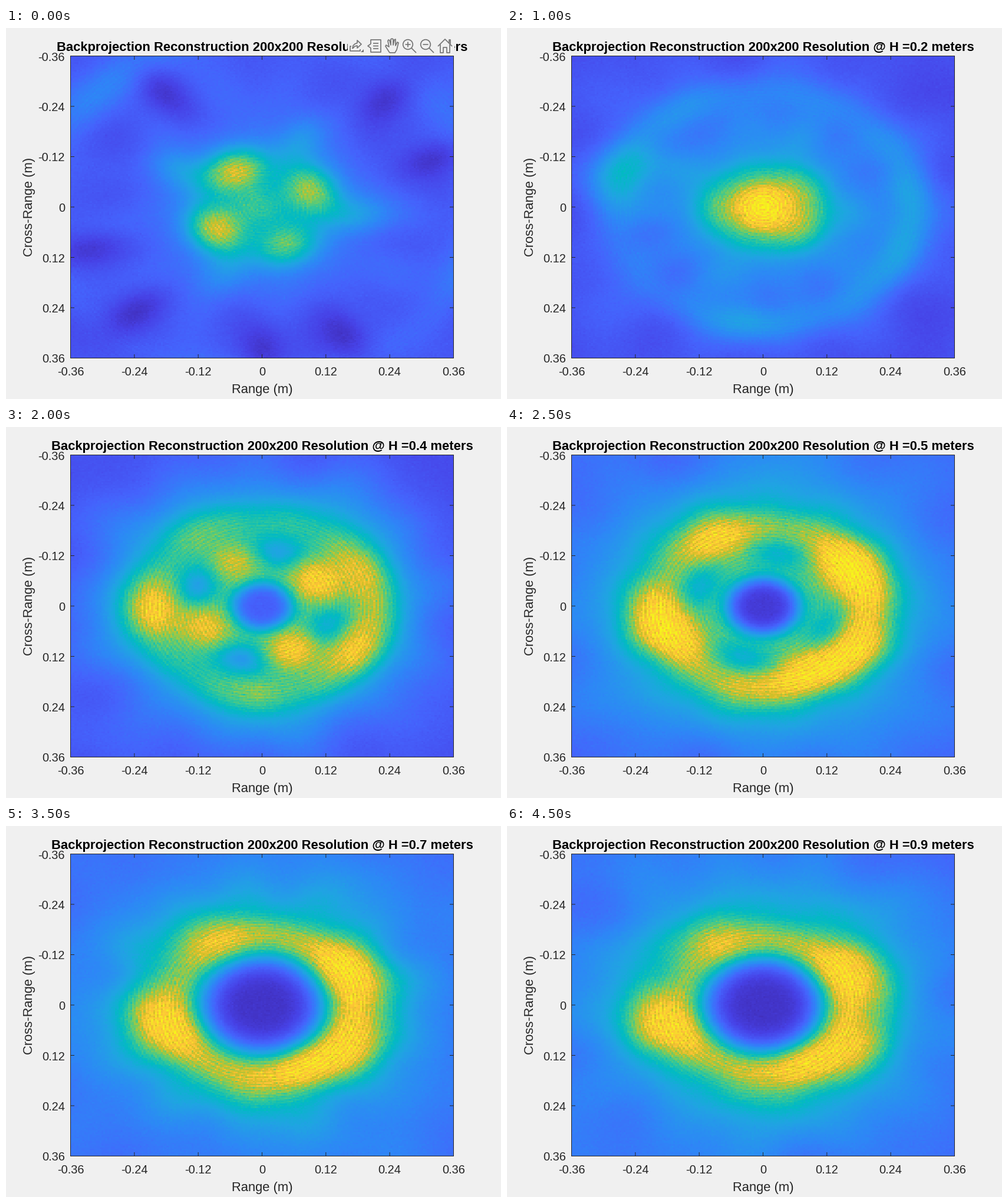
Recreate the animation shown at these times as a matplotlib script. Size 840 by 630 pixels, loop 5000 ms.

```python
import numpy as np
import matplotlib.pyplot as plt
from matplotlib.animation import FuncAnimation
from matplotlib.colors import LinearSegmentedColormap
from matplotlib.patches import Circle, Polygon, Rectangle

W, H, DPI = 840, 630, 100
LEFT, RIGHT, TOP, BOTTOM = 109.5, 759.5, 47.5, 560.5
INK, ICON, PAPER = "#262626", "#757575", "#f0f0f0"
FONT = "Liberation Sans"

PARULA = [
    (.242, .150, .660), (.278, .256, .899), (.270, .389, .991),
    (.179, .529, .968), (.125, .646, .888), (.007, .731, .766),
    (.216, .784, .592), (.504, .799, .348), (.820, .750, .154),
    (.997, .766, .220), (.960, .914, .142), (.977, .984, .081)]
CMAP = LinearSegmentedColormap.from_list("parula", PARULA, 256)

# Round part of the picture, by scan height in metres.
HEIGHTS = (0, .1, .3, .4, .5, .7)
PROFILE = dict(
    level=(.15, .14, .11, .11, .18, .19),
    skirt=(.20, .20, .20, .20, .15, .15),
    spread=(13, 12, 24, 25, 28, 28),
    plate=(0, 0, .10, .24, .24, .17),
    ring=(.03, .05, .08, .08, .16, .23),
    hole=(0, 0, 0, .38, .50, .46),
    pit=(4, 4, 4, 5, 6, 9.8))

# Reflectors as bearing in degrees (clockwise from right) and strength.
MAIN = [(-31, .40), (60, .40), (243, .27), (155, .33)]
TRAILING = [(34, .22), (-29, .18), (178, .14)]
ON_RING = [(-8, .12), (22, .10), (95, .10), (235, .10)]
GAPS = [(202, -.22), (107, -.22), (283, -.20), (25, -.18)]
RAYS = [(5, .13), (210, .11), (295, .10), (115, .08)]
SHADES = [(b, -.10) for b in (236, 312, 340, 163, 134, 90, 63)]

axis = (np.arange(200) + .5) * .36 - 36
X, Y = np.meshgrid(axis, axis)
R, THETA = np.hypot(X, Y), np.arctan2(Y, X)


def bell(q, power=1):
    return np.exp(-.5 * np.abs(q) ** (2 * power))


def lobes(group, radius, gain, depth=3.3, width=None):
    """Sum of soft spots, each deep along its bearing and wide across it."""
    width = width or 3 + abs(radius) / 10
    total = 0
    for bearing, strength in group:
        c, s = np.cos(np.radians(bearing)), np.sin(np.radians(bearing))
        along, across = X * c + Y * s - radius, Y * c - X * s
        total = total + gain * strength * bell(along / depth) * bell(across / width)
    return total


def field(h):
    p = {name: np.interp(h, HEIGHTS, keys) for name, keys in PROFILE.items()}
    ring = 14 + 27 * np.exp(-h / .3)
    reach = min(55 * h - 10, 17.5)      # reflectors cross the centre, then settle
    early = np.exp(-(h / .2) ** 2)
    focus = np.exp(-((h - .15) / .08) ** 2)

    v = p["level"] + p["skirt"] * bell(R / p["spread"]) + p["plate"] * bell(R / 24, 2)
    v += p["ring"] * bell((R - ring) / 3) * (1 + .28 * np.cos(THETA - .5))
    v -= p["hole"] * bell(R / p["pit"], 2)
    v += .3 * focus * bell(R / 8.8, 2)

    fade = np.interp(h, (0, .3, .5, .7), (1.1, .9, .8, .5))
    v += lobes(MAIN, reach, fade * (1 - .8 * focus))
    v += lobes(TRAILING, min(reach + 8, 21), 1 - .65 * early)
    grow = min(1, .45 + 1.5 * h)
    v += lobes(ON_RING, max(ring, 21), grow)
    v += lobes([(max(219 - 100 * h, 166), .23)], max(ring, 21), grow, 4)
    v += lobes(GAPS, 13, np.exp(-((h - .42) / .13) ** 2), 2.7, 4.2)
    v += lobes(RAYS, 17, early, 5, 3)
    v += lobes(SHADES, ring - 7, early, 5.5, 3)
    return v, ring


def picture(i):
    v, ring = field(i / 10)
    rng = np.random.RandomState(i + 3)
    for n in (3, 5, 8, 13):
        turn, wave = rng.uniform(0, 6.3, 2)
        streak = np.sin(n * THETA + turn) * np.cos(R / 6 + wave)
        v += .014 * np.clip((R - 16) / 10, 0, 1) * streak
    v = np.where(v > .82, .82 + .3 * (v - .82), v)
    bright = np.clip(v - .38, 0, .4)
    near = bell((R - ring) / 4)
    v += (.006 * near + .12 * bright) * np.sin(2 * np.pi * R / .83)
    v += (.005 + .07 * bright) * rng.standard_normal(v.shape)
    return np.clip(v, .005, .97)


fig = plt.figure(figsize=(W / DPI, H / DPI), dpi=DPI, facecolor=PAPER)
ax = fig.add_axes([0, 0, 1, 1])
ax.axis("off")


def text(x, y, s, px, **kw):
    kw = {"ha": "center", "va": "baseline", "color": INK, **kw}
    return ax.text(x, y, s, fontsize=px * 72 / DPI, family=FONT, **kw)


def line(points, color=INK, width=1, **kw):
    return ax.plot(*zip(*points), color=color, lw=width * 72 / DPI, snap=False,
                   solid_capstyle="butt", **kw)[0]


image = ax.imshow(picture(0), cmap=CMAP, vmin=0, vmax=1, interpolation="nearest",
                  extent=(110, 760, 561, 48), aspect="auto")
ax.set(xlim=(0, W), ylim=(H, 0))
ax.add_patch(Rectangle((LEFT, TOP), RIGHT - LEFT, BOTTOM - TOP, fill=False,
                       ec=INK, lw=72 / DPI, snap=False))

for k in range(7):
    label = f"{-.36 + .12 * k:.2f}" if k != 3 else "0"
    tx = LEFT + (RIGHT - LEFT) * k / 6
    ty = TOP + (BOTTOM - TOP) * k / 6
    for end, step in ((TOP, 6.5), (BOTTOM, -6.5)):
        line([(tx, end), (tx, end + step)])
    for end, step in ((LEFT, 6.5), (RIGHT, -6.5)):
        line([(end, ty), (end + step, ty)])
    text(tx, 590, label, 20)
    text(100, ty + 8, label, 20, ha="right")

text(434.5, 620, "Range (m)", 22)
text(45, 304, "Cross-Range (m)", 22, rotation=90, rotation_mode="anchor")
title = text(434.5, 39, "", 22, color="black", weight="bold")


def toolbar():
    parts = [ax.add_patch(Rectangle((580, 17), 181, 30, fc=PAPER, ec="none", zorder=4))]

    def stroke(*points):
        parts.append(line(points, ICON, 1.7, zorder=5))

    def shape(patch):
        patch.set(zorder=5)
        parts.append(ax.add_patch(patch))

    # export
    stroke((586, 31), (584, 31), (584, 39), (601, 39), (601, 36))
    stroke((588, 35), (589, 30), (592, 27), (596, 25.5), (596, 21), (603, 27.5),
           (596, 34), (596, 30), (592, 31), (588, 35))
    shape(Polygon([(607, 36), (607, 41), (602, 41)], fc=ICON, ec="none"))
    # data tip
    stroke((619, 27), (619, 20), (636, 20), (636, 41), (619, 41), (619, 34),
           (614, 30.5), (619, 27))
    for y in (26, 30.5, 35):
        stroke((623, y), (632, y))
    # pan hand
    stroke((651, 42), (644, 31), (645, 29), (650, 32), (648, 22), (649, 20),
           (651, 21), (653, 29), (653, 19), (655, 18), (657, 19), (657, 29),
           (659, 20), (661, 19), (661, 30), (664, 24), (666, 25), (663, 37),
           (660, 42), (651, 42))
    # zoom in and out
    for cx in (682, 712):
        shape(Circle((cx, 28), 8.3, fill=False, ec=ICON, lw=1.7 * 72 / DPI))
        stroke((cx + 6, 34), (cx + 14, 42))
        stroke((cx - 4.5, 28), (cx + 4.5, 28))
    stroke((682, 23.5), (682, 32.5))
    # home
    stroke((733, 31), (745, 19), (757, 31))
    stroke((737, 28), (737, 42), (742, 42), (742, 33), (748, 33), (748, 42),
           (753, 42), (753, 28))
    stroke((752, 25), (752, 20), (754, 20), (754, 27))
    return parts


tools = toolbar()


def update(i):
    image.set_data(picture(i))
    title.set_text("Backprojection Reconstruction 200x200 Resolution "
                   f"@ H ={i / 10:g} meters")
    for part in tools:
        part.set_visible(i < 2)
    return [image, title, *tools]


anim = FuncAnimation(fig, update, frames=10, interval=500, repeat=True,
                     repeat_delay=0, blit=False)
plt.show()
```
